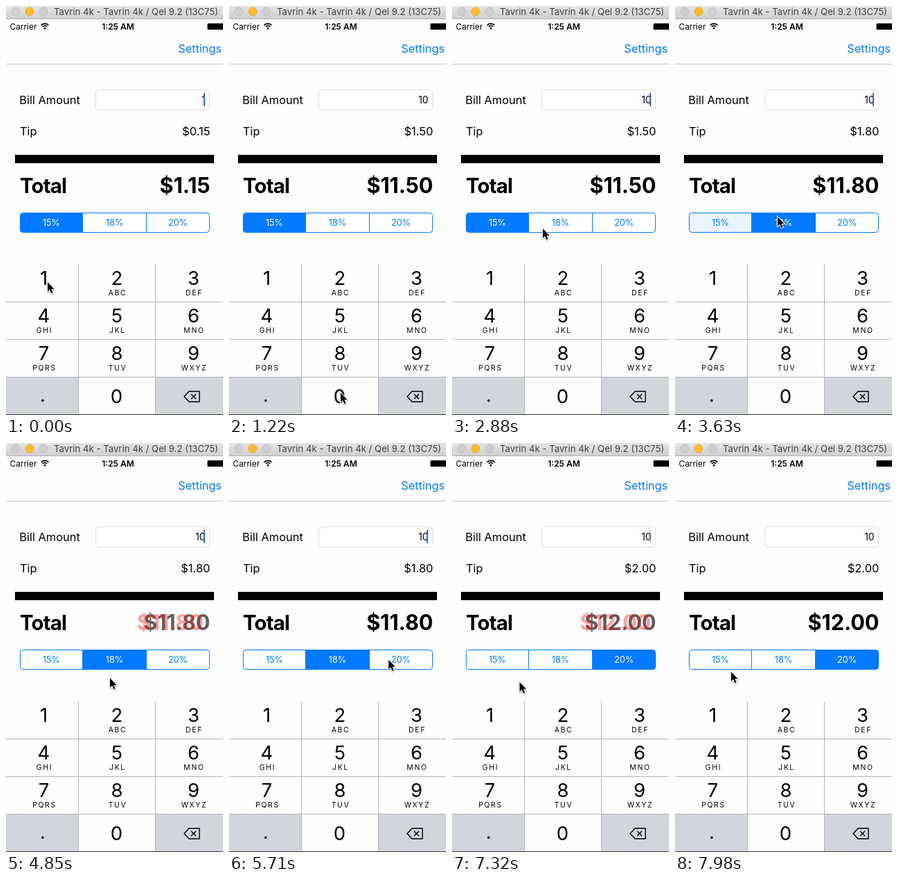
An HTML page with a canvas for the animation above (8000 ms loop, 313 px wide and 588 px high).

```html
<!DOCTYPE html>
<html lang="en">
<head>
<meta charset="utf-8">
<title>Tip calculator</title>
<style>
html, body { margin: 0; width: 100%; height: 100%; overflow: hidden; background: #fefefe; }
canvas { display: block; width: 313px; height: 588px; }
</style>
</head>
<body>
<canvas id="stage"></canvas>
<script>
const W = 313, H = 588, LOOP = 8000;
const BLUE = '#007aff', GRAY = '#d2d5db', LINE = '#b4b5b8', PAPER = '#fefefe';
const FACE = 'Inter, "Open Sans", sans-serif';

const canvas = document.getElementById('stage');
const ratio = window.devicePixelRatio || 1;
canvas.width = W * ratio;
canvas.height = H * ratio;
const ctx = canvas.getContext('2d');
ctx.scale(ratio, ratio);

// Each entry: when it applies, bill, tip, total, selected segment
const entries = [
  { at: 0, bill: '1', tip: '$0.15', total: '$1.15', seg: 0 },
  { at: 540, bill: '10', tip: '$1.50', total: '$11.50', seg: 0 },
  { at: 3450, bill: '10', tip: '$1.80', total: '$11.80', seg: 1 },
  { at: 5930, bill: '10', tip: '$2.00', total: '$12.00', seg: 2 }
];
const alerts = [1530, 4430, 6910];
const segments = [
  { x: 20.5, w: 90, label: '15%' },
  { x: 110.5, w: 92, label: '18%' },
  { x: 202.5, w: 91, label: '20%' }
];
const letters = ['', 'ABC', 'DEF', 'GHI', 'JKL', 'MNO', 'PQRS', 'TUV', 'WXYZ'];
const columns = [54.5, 160, 270.5];

// Pointer waypoints: time, x, y
const path = [
  [60, 60, 397], [450, 150, 560], [670, 146, 560], [960, 146, 560],
  [1220, 161, 556], [1510, 162, 556], [2290, 162, 562], [2400, 152, 569],
  [2600, 92, 430], [2880, 131, 320], [3100, 152, 303], [3280, 148, 303],
  [3640, 148, 303], [4230, 152, 329], [4500, 148, 342], [4850, 150, 338],
  [5050, 163, 342], [5850, 236, 309], [6000, 236, 309], [6530, 177, 329],
  [6700, 150, 338], [7150, 98, 346], [7520, 97, 341], [7960, 81, 329]
];

const clamp = v => Math.max(0, Math.min(1, v));
const smooth = v => { v = clamp(v); return v * v * (3 - 2 * v); };

function rect(x, y, w, h, color) {
  ctx.fillStyle = color;
  ctx.fillRect(x, y, w, h);
}

function text(str, x, y, size, { color = '#000', weight = 400, align = 'left', spacing = 0 } = {}) {
  ctx.font = `${weight} ${size}px ${FACE}`;
  ctx.letterSpacing = spacing + 'px';
  ctx.textAlign = align;
  ctx.fillStyle = color;
  ctx.fillText(str, x, y);
  ctx.letterSpacing = '0px';
}

function dot(x, y, r, fill, stroke) {
  ctx.beginPath();
  ctx.arc(x, y, r, 0, Math.PI * 2);
  ctx.fillStyle = fill;
  ctx.fill();
  if (stroke) {
    ctx.strokeStyle = stroke;
    ctx.lineWidth = 0.8;
    ctx.stroke();
  }
}

function poly(points, close) {
  ctx.beginPath();
  points.forEach(([x, y]) => ctx.lineTo(x, y));
  if (close) ctx.closePath();
}

function titleBar() {
  const shade = ctx.createLinearGradient(0, 0, 0, 18);
  shade.addColorStop(0, '#e6e4e6');
  shade.addColorStop(1, '#d1cfd1');
  rect(0, 0, W, 18, shade);
  rect(0, 18, W, 1, '#b3b1b3');
  dot(14, 8, 6, '#d0ced0', '#bdbbbd');
  dot(34, 8, 6, '#fdbc2f', '#dfa023');
  dot(54, 8, 6, '#d0ced0', '#bdbbbd');
  text('Tavrin 4k - Tavrin 4k / Qel 9.2 (13C75)', 69, 13, 13.2, { color: '#404040' });
}

function statusBar() {
  text('Carrier', 5.5, 33.5, 11.9);
  ctx.strokeStyle = '#000';
  ctx.lineWidth = 1.6;
  for (const r of [4.6, 7.6]) {
    ctx.beginPath();
    ctx.arc(56, 33, r, -Math.PI * 0.75, -Math.PI * 0.25);
    ctx.stroke();
  }
  ctx.beginPath();
  ctx.moveTo(56, 34);
  ctx.arc(56, 33.5, 2.6, -Math.PI * 0.75, -Math.PI * 0.25);
  ctx.fillStyle = '#000';
  ctx.fill();
  text('1:25 AM', 161.5, 33.5, 12, { weight: 600, align: 'center' });
  ctx.beginPath();
  ctx.roundRect(290.5, 25, 26, 9, 1.5);
  ctx.fill();
  text('Settings', 248.3, 67, 16.3, { color: BLUE });
  rect(0, 83, W, 1, '#c4c4c6');
}

function caretAlpha(t) {
  if (t < 960) return 1;
  const p = (t - 960) % 960;
  if (p < 320) return 1 - smooth(p / 320);
  return smooth((p - 550) / 140);
}

function form(t, entry) {
  text('Bill Amount', 19.3, 140.5, 16.4);
  ctx.beginPath();
  ctx.roundRect(129.5, 120.5, 164, 29, 5);
  ctx.fillStyle = '#fff';
  ctx.fill();
  ctx.strokeStyle = '#dcdcdc';
  ctx.lineWidth = 1;
  ctx.stroke();
  text(entry.bill, 287.5, 140, 13.8, { align: 'right' });
  ctx.globalAlpha = caretAlpha(t);
  rect(285, 125, 2, 19, '#2f63e6');
  ctx.globalAlpha = 1;
  text('Tip', 20, 186, 16.4);
  text(entry.tip, 294.5, 186, 16.5, { align: 'right' });
  rect(13, 214, 287, 12, '#000');
  text('Total', 20, 269, 29.5, { weight: 700, spacing: -0.9 });
}

// The total dissolves to red for a second while the red copy shakes
function total(t, value) {
  const draw = (dx, color, alpha) => {
    ctx.globalAlpha = alpha;
    text(value, 294.5 + dx, 269, 30.6, { weight: 700, align: 'right', color });
    ctx.globalAlpha = 1;
  };
  const start = alerts.find(a => t >= a && t < a + 1000);
  if (start === undefined) return draw(0, '#000', 1);
  const age = t - start;
  const red = smooth(age / 1000);
  const swing = Math.abs(((age / 70 + 1) % 2) - 1);
  draw(0, '#000', 1 - red);
  draw(age < 560 ? -9.8 + 19.6 * swing : 0, '#f00', red);
}

function segmented(t, index) {
  const entry = entries[index];
  const before = index ? entries[index - 1].seg : entry.seg;
  const fade = smooth((t - entry.at) / 220);
  ctx.save();
  ctx.beginPath();
  ctx.roundRect(20.5, 297.5, 273, 28, 4);
  ctx.fillStyle = '#fff';
  ctx.fill();
  ctx.clip();
  segments.forEach((s, i) => {
    let on = i === entry.seg ? 1 : 0;
    if (before !== entry.seg) {
      if (i === before) on = 1 - fade;
      if (i === entry.seg) on = clamp(0.3 + fade);
    }
    ctx.globalAlpha = on;
    rect(s.x, 297, s.w, 29, BLUE);
    ctx.globalAlpha = 1;
    text(s.label, s.x + s.w / 2, 316, 12.7, { align: 'center', color: on > 0.5 ? '#fff' : BLUE });
  });
  ctx.restore();
  ctx.strokeStyle = BLUE;
  ctx.lineWidth = 1;
  ctx.beginPath();
  ctx.roundRect(20.5, 297.5, 273, 28, 4);
  for (const s of segments.slice(1)) {
    ctx.moveTo(s.x, 297);
    ctx.lineTo(s.x, 326);
  }
  ctx.stroke();
}

function keypad(t) {
  rect(0, 371, W, 216, PAPER);
  rect(0, 533, 104, 54, GRAY);
  rect(215, 533, W - 215, 54, GRAY);
  if (t > 490 && t < 620) rect(105, 533, 110, 54, GRAY);
  for (const x of [104, 215]) rect(x, 371, 1, 216, LINE);
  for (const y of [425, 479, 533]) rect(0, y, W, 1, LINE);
  letters.forEach((label, i) => {
    const x = columns[i % 3], y = 401 + 54 * Math.floor(i / 3);
    text(String(i + 1), x, y, 27.5, { align: 'center' });
    text(label, x + 1, y + 15, 10.4, { align: 'center', spacing: 1.7 });
  });
  text('.', 53, 569, 27, { align: 'center' });
  text('0', 159.5, 570.5, 27.5, { align: 'center' });

  ctx.strokeStyle = '#000';
  ctx.lineWidth = 1.4;
  ctx.lineJoin = 'round';
  poly([[257, 561.5], [264, 554], [279, 554], [279, 569], [264, 569]], true);
  ctx.stroke();
  for (const d of [-3.4, 3.4]) {
    poly([[270.5 - d, 558.1], [270.5 + d, 564.9]]);
    ctx.stroke();
  }
  rect(0, 587, W, 1, '#3a3a3c');
}

function pointer(t) {
  let [, x, y] = path[0];
  for (let i = 1; i < path.length; i++) {
    const [t0, x0, y0] = path[i - 1], [t1, x1, y1] = path[i];
    if (t < t0) break;
    const k = smooth((t - t0) / (t1 - t0));
    x = x0 + (x1 - x0) * k;
    y = y0 + (y1 - y0) * k;
  }
  ctx.save();
  ctx.translate(x, y);
  poly([[0, 0], [0, 13.6], [3.1, 10.8], [5.3, 16], [7.6, 15], [5.4, 10], [9.6, 10]], true);
  ctx.shadowColor = 'rgba(0,0,0,.35)';
  ctx.shadowBlur = 2;
  ctx.shadowOffsetY = 1;
  ctx.lineJoin = 'miter';
  ctx.lineWidth = 2;
  ctx.strokeStyle = '#fff';
  ctx.stroke();
  ctx.shadowColor = 'transparent';
  ctx.fillStyle = '#000';
  ctx.fill();
  ctx.restore();
}

function frame(now) {
  const t = now % LOOP;
  let index = 0;
  entries.forEach((e, i) => { if (t >= e.at) index = i; });
  const entry = entries[index];
  rect(0, 0, W, H, PAPER);
  titleBar();
  statusBar();
  form(t, entry);
  total(t, entry.total);
  segmented(t, index);
  keypad(t);
  pointer(t);
}

const began = performance.now();
function tick() {
  frame(performance.now() - began);
  requestAnimationFrame(tick);
}
tick();
</script>
</body>
</html>
```
